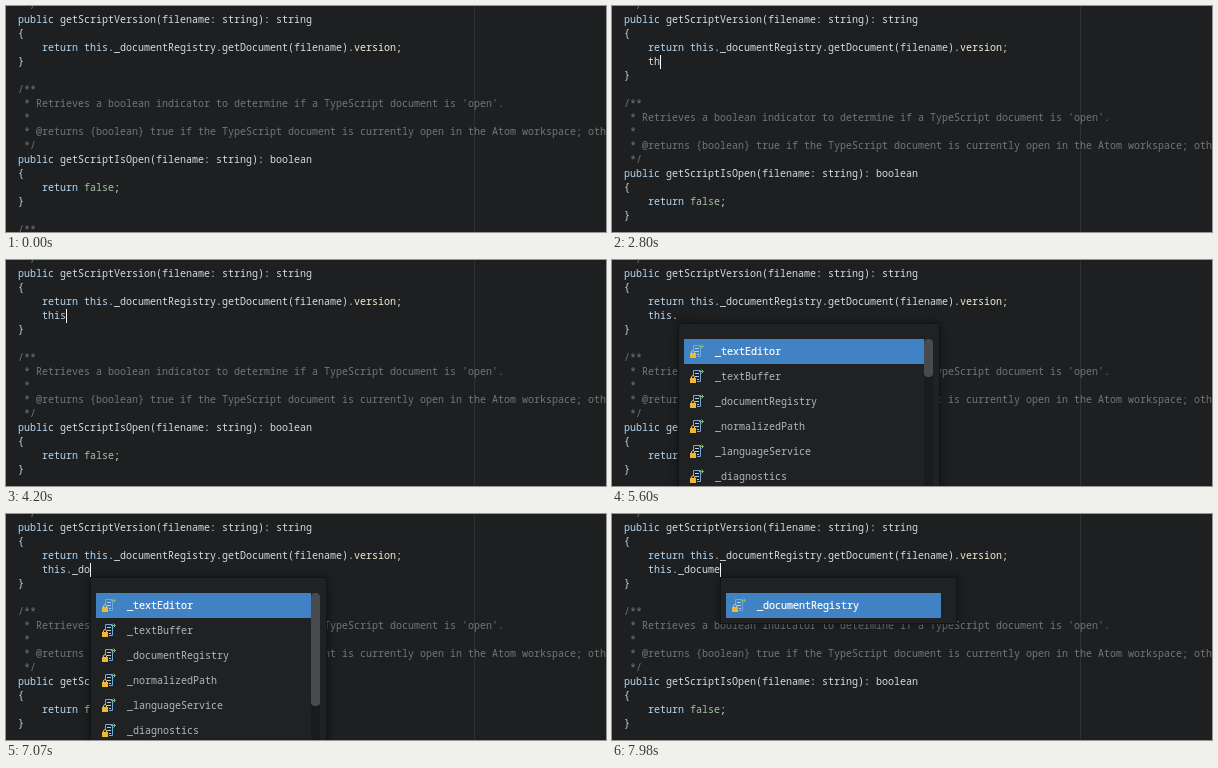
An HTML page for the animation above (8 s loop, 600 by 226 pixels).

```html
<!DOCTYPE html>
<html lang="en">
<head>
<meta charset="utf-8">
<title>Editor autocomplete</title>
<style>
html, body { margin: 0; width: 100%; height: 100%; overflow: hidden; background: #1d1f21; }
#stage { position: relative; width: 600px; height: 226px; overflow: hidden; background: #1d1f21;
  font: 10px/14px "Noto Sans Mono", "DejaVu Sans Mono", monospace; color: #d6dce0;
  font-variant-ligatures: none; }
#guide { position: absolute; left: 468px; top: 0; width: 1px; height: 100%; background: #2e3032; }
pre { position: absolute; left: 12px; top: -8px; margin: 0; font: inherit; }
pre div { height: 14px; white-space: pre; }
.k { color: #b5d8f3; }
.c { color: #737577; }
.v { color: #f0efd2; }
.n { color: #a6c2a6; }
#caret { position: absolute; width: 1px; height: 14px; background: #fff; }
#popup { position: absolute; top: 63px; box-sizing: border-box; padding: 15px 0 5px 5px;
  border: 1px solid #131415; background: #1f2123; box-shadow: 0 0 9px rgba(0, 0, 0, .45); }
.row { position: relative; height: 25px; line-height: 24px; padding-left: 31px; white-space: pre; color: #b4b7b9; }
.row:first-child { background: #4182c4; color: #fff; -webkit-text-stroke: .2px #fff; }
.row svg { position: absolute; left: 5px; top: 4px; }
#bar { position: absolute; top: 15px; bottom: 5px; width: 9px; background: #191b1c; }
#thumb { width: 9px; border-radius: 4px; background: #484b4d; }
</style>
</head>
<body>
<div id="stage">
<div id="guide"></div>
<pre><div class="c"> */</div><div><span class="k">public</span> getScriptVersion(filename: string): string</div><div>{</div><div>    <span class="k">return this</span>._documentRegistry.getDocument(filename).<span class="v">version</span>;</div><div id="typed"></div><div>}</div><div></div><div class="c">/**</div><div class="c"> * Retrieves a boolean indicator to determine if a TypeScript document is 'open'.</div><div class="c"> *</div><div class="c"> * @returns {boolean} true if the TypeScript document is currently open in the Atom workspace; otherwise, false.</div><div class="c"> */</div><div><span class="k">public</span> getScriptIsOpen(filename: string): boolean</div><div>{</div><div>    <span class="k">return</span> <span class="n">false</span>;</div><div>}</div><div></div><div class="c">/**</div></pre>
<div id="caret"></div>
<div id="popup"><div id="rows"></div><div id="bar"><div id="thumb"></div></div></div>
</div>
<script>
const $ = id => document.getElementById(id);
const LOOP = 8000, CHAR = 6, INDENT = 36;

const members = ['_textEditor', '_textBuffer', '_documentRegistry', '_normalizedPath',
  '_languageService', '_diagnostics', '_isOpen', '_version'];
const lists = {
  words: { items: ['this', 'throw'], row: 215 },
  wide: { items: members, row: 240, thumb: 38 },
  members: { items: members, row: 215, thumb: 113 },
  match: { items: ['_documentRegistry'], row: 215 }
};

// time, typed text (null: line not there yet), caret shown, list, list column if not at the caret
const steps = [
  [0, null, 0], [70, null, 1], [420, null, 0], [770, null, 1], [1120, null, 0], [1470, null, 1],
  [1610, '', 1], [2100, '', 0], [2450, '', 1], [2660, 't', 1], [2800, 'th', 1], [3150, 'th', 0],
  [3220, 'th', 0, 'words'], [3570, 'th', 1, 'words'], [3920, 'th', 0, 'words'],
  [4200, 'this', 1], [4620, 'this', 0], [4970, 'this', 1], [5250, 'this.', 1],
  [5600, 'this.', 0, 'wide'], [5740, 'this._', 1, 'wide', 5], [6090, 'this._', 0, 'wide'],
  [6370, 'this._', 1, 'wide'], [6510, 'this._', 0, 'members'],
  [6860, 'this._d', 1, 'members'], [7000, 'this._do', 1, 'members'],
  [7210, 'this._doc', 1, 'members'], [7350, 'this._docu', 1, 'members'],
  [7700, 'this._docu', 0, 'members'], [7840, 'this._docum', 1, 'members'],
  [7980, 'this._docume', 1, 'match']
];

const icon = `<svg width="16" height="16" fill="none">
  <path d="M4.5 8V2.5h7v11H8" stroke="#6fa9dc"/>
  <path d="M6 5.5h4M6 8.5h4M8 11.5h2" stroke="#a9cdec"/>
  <path d="M10 3.5h4M12.5 1.5l2 2-2 2" stroke="#87bd62"/>
  <path d="M2.5 10V8.5q1.5-2 3 0V10" stroke="#e8c765"/>
  <path d="M1 10h6v5H1z" fill="#efb73a"/></svg>`;

function place(el, x, y) {
  el.style.left = x + 'px';
  el.style.top = y + 'px';
}

function showList(name, x) {
  const popup = $('popup');
  popup.hidden = !name;
  popup.style.display = name ? 'block' : 'none';
  if (!name) return;
  const { items, row, thumb } = lists[name];
  popup.style.left = x + 'px';
  popup.style.width = row + 22 + 'px';
  $('rows').style.width = row + 'px';
  $('rows').innerHTML = items.map(s => `<div class="row">${icon}${s}</div>`).join('');
  $('bar').style.display = thumb ? 'block' : 'none';
  $('bar').style.left = row + 5 + 'px';
  $('thumb').style.height = (thumb || 0) + 'px';
}

function show([, text, caretOn, list, col]) {
  const typed = $('typed'), fresh = text === null;
  typed.style.display = fresh ? 'none' : 'block';
  typed.innerHTML = '    ' + (text || '').replace('this', '<span class="k">this</span>');
  const x = fresh ? 396 : INDENT + CHAR * text.length;
  place($('caret'), x, fresh ? 35 : 49);
  $('caret').style.visibility = caretOn ? 'visible' : 'hidden';
  showList(list, col === undefined ? x : INDENT + CHAR * col);
}

let current;
function tick() {
  const t = performance.now() % LOOP;
  const step = steps.filter(s => s[0] <= t).pop();
  if (step !== current) show(current = step);
  requestAnimationFrame(tick);
}
tick();
</script>
</body>
</html>
```
